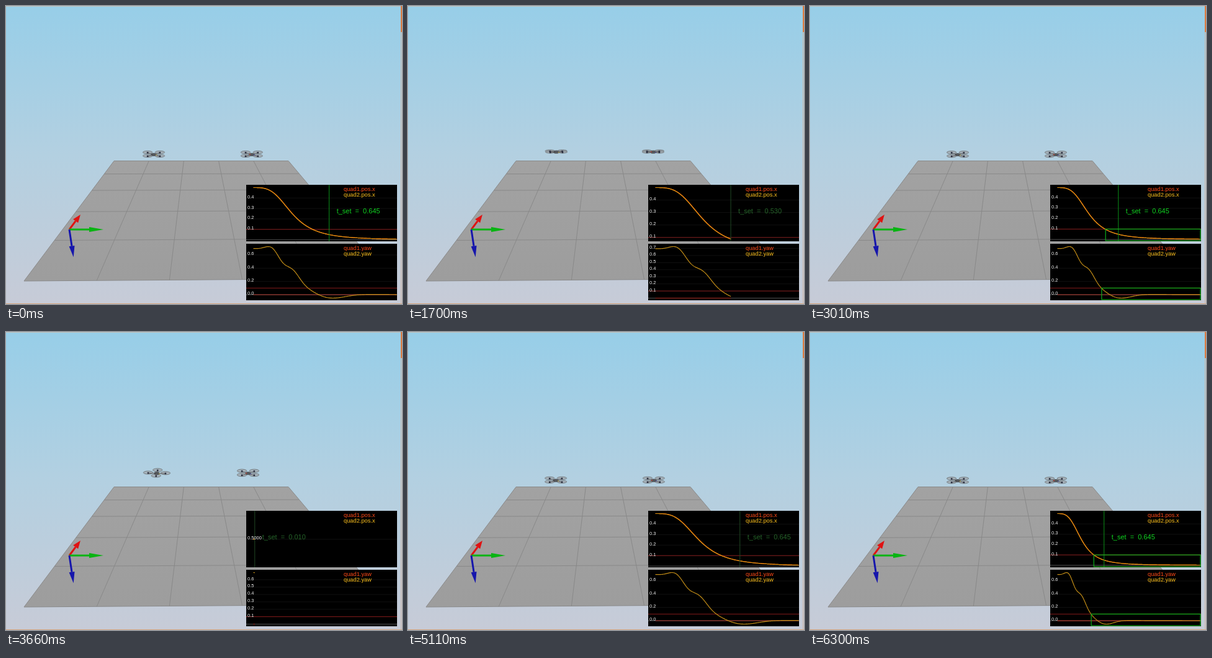
Animation of 638x480 px, one loop 6.44 s. Source, as an HTML page with a canvas:

```html
<!DOCTYPE html>
<html lang="en">
<head>
<meta charset="utf-8">
<title>Two quadrotors settling</title>
<style>
html, body { margin: 0; width: 100%; height: 100%; overflow: hidden; }
canvas { display: block; }
</style>
</head>
<body>
<canvas id="stage" width="638" height="480"></canvas>
<script>
const ctx = document.getElementById('stage').getContext('2d');
const LOOP = 6440, BEAT = 130.7, SIM_STEP = .0985;
const SETTLE = .645, LIMIT = .1;
const FONT = '"Liberation Sans", Arial, sans-serif';

const bell = (t, center, width) => Math.exp(-(((t - center) / width) ** 2));
const falloff = (t, half, power) => 1 / (1 + (Math.max(0, t) / half) ** power);

const posX = t => .5 * falloff(t, .331, 3.31);

// Turn to zero: a steep fall with a wobble on it, then an undershoot.
const yaw = t => .7 * falloff(t, .34, 4.5)
  - .075 * Math.cos((t - .25) * 2 * Math.PI / .26) * bell(t, .25, .14)
  - .085 * bell(t, .64, .18);

// Vertical squash of the airframe: pitch forward, then pitch back to brake.
const squash = t => .29 + .55 * bell(t, .1, .06) - .42 * bell(t, .36, .2);

// Each run lasts 20 beats; the loop opens 12 beats into one.
function simTime(ms) {
  const beat = Math.floor(ms / BEAT);
  return beat < 28 ? .038 + (beat + 12) % 20 * SIM_STEP : .0101 + (beat - 28) * SIM_STEP;
}

const mix = (a, b, u) => a + (b - a) * u;
const mixPoint = (p, q, u) => [mix(p[0], q[0], u), mix(p[1], q[1], u)];

function path(points, close) {
  ctx.beginPath();
  points.forEach(([x, y]) => ctx.lineTo(x, y));
  if (close) ctx.closePath();
}

function stroke(points, color, width = 1) {
  path(points);
  ctx.strokeStyle = color;
  ctx.lineWidth = width;
  ctx.stroke();
}

function fill(points, color) {
  path(points, true);
  ctx.fillStyle = color;
  ctx.fill();
}

function rect(x, y, w, h, color) {
  ctx.fillStyle = color;
  ctx.fillRect(x, y, w, h);
}

function text(s, x, y, size, color) {
  ctx.font = `${size}px ${FONT}`;
  ctx.textBaseline = 'middle';
  ctx.fillStyle = color;
  ctx.fillText(s, x, y);
}

function gradient(y0, y1, ...colors) {
  const g = ctx.createLinearGradient(0, y0, 0, y1);
  colors.forEach((c, i) => g.addColorStop(i / (colors.length - 1), c));
  return g;
}

function drawFloor() {
  const farL = [174, 249.5], farR = [455, 249.5], nearL = [29, 443], nearR = [615, 439];
  fill([farL, farR, nearR, nearL], gradient(250, 443, '#a2a2a2', '#9d9d9d'));
  for (let i = 0; i <= 5; i++) {
    const u = i / 5, depth = u / (u + 2.05 * (1 - u));
    stroke([mixPoint(farL, farR, u), mixPoint(nearL, nearR, u)], '#898989');
    stroke([mixPoint(farL, nearL, depth), mixPoint(farR, nearR, depth)], '#898989');
  }
}

function drawArrow(angle, shaft, length, halfWidth, color) {
  ctx.save();
  ctx.translate(102, 360);
  ctx.rotate(angle);
  stroke([[0, 0], [shaft, 0]], color, 3);
  fill([[shaft, -halfWidth], [shaft, halfWidth], [length, 0]], color);
  ctx.restore();
}

function drawScene() {
  rect(0, 0, 638, 480, gradient(0, 480, '#97cee8', '#b3d0e1', '#c7cbd7'));
  drawFloor();
  drawArrow(-.93, 17, 30, 5, '#e01212');
  drawArrow(0, 32, 55, 4, '#08b412');
  drawArrow(1.42, 27, 45, 4.5, '#1616ac');

  rect(0, 0, 638, 1, '#c2c1ba');
  rect(0, 479, 638, 1, '#d5a67e');
  rect(636, 0, 1, 480, '#cdb5a6');
  rect(636, 0, 2, 42, '#dd7b41');
}

function ellipse(x, y, rx, ry, color, outline) {
  ctx.beginPath();
  ctx.ellipse(x, y, rx, ry, 0, 0, 7);
  ctx.fillStyle = color;
  ctx.fill();
  if (!outline) return;
  ctx.strokeStyle = outline;
  ctx.stroke();
}

function drawDrone(x, y, heading, k, accents) {
  const rotors = [0, 1, 2, 3].map(i => {
    const a = heading + i * Math.PI / 2;
    return [x + 14 * Math.cos(a), y - 14 * Math.sin(a) * k];
  });
  ctx.lineWidth = .9;
  rotors.forEach(([rx, ry]) =>
    ellipse(rx, ry - .8, 7.7, Math.max(1.8, 7.7 * Math.abs(k)), 'rgba(164,174,181,.85)', '#6f7478'));
  rotors.forEach(([rx, ry]) => {
    stroke([[x, y], [rx, ry]], '#6b6b6d', 1.2);
    rect(rx - 1.3, ry - 1.5, 2.6, 2.6, '#2c3040');
  });
  ellipse(x, y, 4.5, 2.6, '#55585c');
  rect(x - 4, y - 1, 2, 1.5, accents[0]);
  rect(x + 3, y, 2, 1.5, accents[1]);
}

function niceStep(range) {
  if (range < .0015) return .0005;
  const raw = range / 7.5, base = 10 ** Math.floor(Math.log10(raw));
  return base * [1, 2, 5, 10].find(m => m * base >= raw);
}

function drawPlot({ top, name, series, colors, settling }, t) {
  const left = 387, right = 630, height = 91;
  const scale = 231 / Math.max(1.007, t);
  const px = time => 398.5 + time * scale;

  const samples = Array.from({ length: 221 }, (_, i) => i / 220 * t);
  const values = series.flatMap(f => samples.map(f));
  const lo = Math.min(...values), hi = Math.max(...values);
  const mid = (lo + hi) / 2, range = Math.max(.001, hi - lo);
  const py = v => top + 46 - (v - mid) / range * 83;
  const across = (v, color) => stroke([[left, py(v)], [right, py(v)]], color);

  ctx.save();
  ctx.beginPath();
  ctx.rect(left, top, right - left, height);
  ctx.clip();
  rect(left, top, right - left, height, '#000');

  const step = niceStep(range), digits = step < .01 ? 4 : step < .1 ? 2 : 1;
  const labels = [];
  for (let i = Math.ceil(lo / step - 1); i <= hi / step + 1; i++) {
    const y = py(i * step);
    if (y > top + 7 && y < top + 86) labels.push(i * step);
  }
  labels.forEach(v => across(v, '#111111'));
  across(0, '#4c4c4c');
  across(LIMIT, '#841b1b');

  series.forEach((f, i) => stroke(samples.map(s => [px(s), py(f(s))]), colors[i], 1.2));

  const bright = t > 1.2;
  if (settling) {
    const set = Math.min(SETTLE, Math.floor(t * 200) / 200), x = px(set);
    stroke([[x, top], [x, top + height]], bright ? '#0b8f18' : '#204824');
    text(`t_set\u00a0 =\u00a0 ${set.toFixed(3)}`, x + 12, top + 42.5, 11, bright ? '#10d421' : '#256329');
  }
  if (t > 1.5) {
    const x = px(samples.find(s => series[1](s) <= LIMIT)), y = py(LIMIT);
    ctx.strokeStyle = '#0cae1a';
    ctx.lineWidth = 1.2;
    ctx.strokeRect(x, y, right - 1 - x, top + height - 1 - y);
  }

  labels.forEach(v => text(Math.abs(v).toFixed(digits), 389, py(v) - 1.6, 7.5, '#eeeeee'));
  text(`quad1.${name}`, 544, top + 7, 9.3, '#ff4a18');
  text(`quad2.${name}`, 544, top + 16, 9.3, '#ffc21e');
  ctx.restore();
}

const plots = [
  { top: 288, name: 'pos.x', series: [t => posX(t - .003), posX], colors: ['#d04a12', '#e2940f'], settling: true },
  { top: 383, name: 'yaw', series: [() => 0, yaw], colors: ['#a52a20', '#c08b16'] }
];

function draw(now) {
  const t = simTime(now % LOOP);
  drawScene();
  const progress = 1 - posX(t) / .5;
  const y = 227.7 + 12 * progress ** 2.5, k = squash(t);
  drawDrone(243 - 5 * progress, y, yaw(t) + Math.PI / 4, k, ['#46484c', '#a79b55']);
  drawDrone(390 + 6 * progress, y, Math.PI / 4, k, ['#b8483e', '#4c4f92']);
  plots.forEach(p => drawPlot(p, t));
}

const begin = performance.now();
function tick() {
  draw(performance.now() - begin);
  requestAnimationFrame(tick);
}
tick();
</script>
</body>
</html>
```
